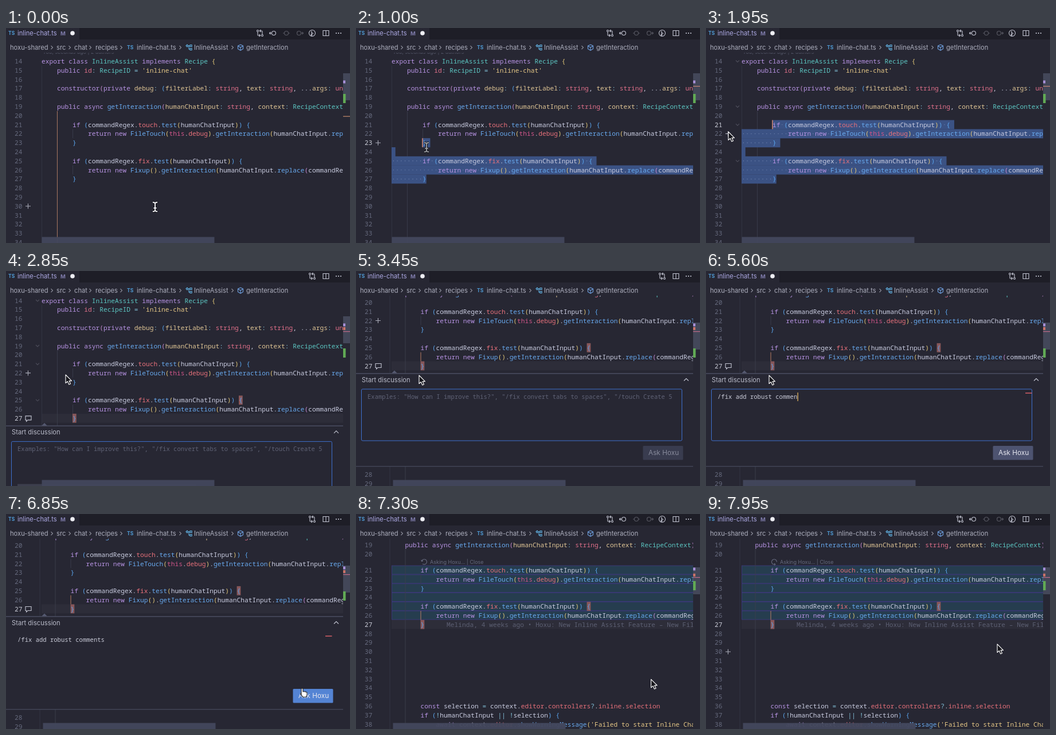
Write an HTML page that moves like this. It is 600 px wide and 375 px high and loops after 8 s.

```html
<!DOCTYPE html>
<html lang="en">
<head>
<meta charset="utf-8">
<title>Inline chat</title>
<style>
  html, body { margin: 0; width: 100%; height: 100%; overflow: hidden; background: #272733; }
  svg { display: block; width: 100vw; height: 100vh; }
  text { white-space: pre; }
  .code { font: 500 11.24px "Noto Sans Mono", monospace; }
  .num { font: 11.24px "Noto Sans Mono", monospace; }
  .input { font: 10.55px "Noto Sans Mono", monospace; }
  .ui { font: 11.2px Inter, sans-serif; }
  .lens { font: 9px Inter, sans-serif; }
  .ts { font: bold 8.5px Inter, sans-serif; }
  .icon { fill: none; stroke: #c3c5d2; stroke-width: 1.1; }
</style>
</head>
<body>
<svg id="stage" viewBox="0 0 600 375" preserveAspectRatio="none"></svg>
<script>
const LOOP = 8000, ROW = 15.8, CH = 6.745;
const OPEN = 2350, CLICK = 6800, CLOSE = 7050, ASK = 7250;
const PROMPT = '/fix add robust comments';
const HINT = 'Examples: "How can I improve this?", "/fix convert tabs to spaces", "/touch Create 5';
const BRACKETS = ['#e3c878', '#c58ad0', '#5aa5ee'];
const C = {
  bg: '#272733', text: '#c9cce0', dim: '#666a7e', key: '#b793e3', type: '#5cc6c2', prim: '#e0708a',
  param: '#dfc595', fn: '#68a9ee', prop: '#e6707a', self: '#d0558a', str: '#e5c786', op: '#85c5dd'
};
const stage = document.getElementById('stage');

// Each entry: line number -> [bracket depth at its start, text]
const lines = {
  14: [0, 'export class InlineAssist implements Recipe {'],
  15: [1, "    public id: RecipeID = 'inline-chat'"],
  17: [1, '    constructor(private debug: (filterLabel: string, text: string, ...args: unknown[]) => void) {}'],
  19: [1, '    public async getInteraction(humanChatInput: string, context: RecipeContext): Promise<null> {'],
  21: [2, '        if (commandRegex.touch.test(humanChatInput)) {'],
  22: [3, '            return new FileTouch(this.debug).getInteraction(humanChatInput.replace(commandRegex'],
  23: [3, '        }'],
  25: [2, '        if (commandRegex.fix.test(humanChatInput)) {'],
  26: [3, '            return new Fixup().getInteraction(humanChatInput.replace(commandRegex.fix'],
  27: [3, '        }'],
  36: [2, '        const selection = context.editor.controllers?.inline.selection'],
  37: [2, '        if (!humanChatInput || !selection) {'],
  38: [3, "            await context.editor.showWarningMessage('Failed to start Inline Chat"]
};
const KEYWORDS = /^(export|class|implements|public|constructor|private|async|if|return|new|const|await)$/;
const TYPES = /^(InlineAssist|Recipe|RecipeID|RecipeContext|Promise)$/;
const PRIMITIVES = /^(string|unknown|void|id)$/;

function esc(s) {
  return s.replace(/&/g, '&amp;').replace(/</g, '&lt;');
}
function span(s, color) {
  return `<tspan fill="${color}">${esc(s)}</tspan>`;
}
function wordColor(word, before, after) {
  if (KEYWORDS.test(word)) return C.key;
  if (TYPES.test(word)) return C.type;
  if (PRIMITIVES.test(word)) return C.prim;
  if (word === 'this') return C.self;
  if (after === '(') return C.fn;
  if (after === ':') return C.param;
  return before === '.' ? C.prop : C.text;
}
function highlight([depth, src]) {
  return src.replace(/'[^']*'?|\w+|[(){}[\]]|\s+|[^\w\s'(){}[\]]/g, (tok, at) => {
    if (/^\s/.test(tok)) return tok;
    if (tok[0] === "'") return span(tok, C.str);
    if (/[({[]/.test(tok)) return span(tok, BRACKETS[depth++ % 3]);
    if (/[)}\]]/.test(tok)) return span(tok, BRACKETS[--depth % 3]);
    if (/^\w/.test(tok)) return span(tok, wordColor(tok, src[at - 1], src[at + tok.length]));
    return span(tok, /[=|!?:]/.test(tok) ? C.op : C.text);
  });
}
const painted = Object.fromEntries(Object.entries(lines).map(([n, l]) => [n, highlight(l)]));

const rect = (x, y, w, h, fill, more = '') =>
  `<rect x="${x}" y="${y}" width="${w}" height="${h}" fill="${fill}" ${more}/>`;
const text = (cls, x, y, fill, s, more = '') =>
  `<text class="${cls}" x="${x}" y="${y}" fill="${fill}" ${more}>${s}</text>`;
const icon = (x, y, d, more = '') =>
  `<path class="icon" transform="translate(${x} ${y})" d="${d}" ${more}/>`;

const RING = 'M-3.5 0a3.5 3.5 0 1 0 7 0a3.5 3.5 0 1 0-7 0';
const COMPARE = 'M-4-2.5v5.5q0 1 1 1h3m-1.5-2l2 2l-2 2M4 2.5v-5.5q0-1-1-1h-3m1.5-2l-2 2l2 2M-5.5-4a1.5 1.5 0 1 0 3 0a1.5 1.5 0 1 0-3 0M2.5 4a1.5 1.5 0 1 0 3 0a1.5 1.5 0 1 0-3 0';
const SPLIT = 'M-5-4.5h10v9h-10zM0-4.5v9';
const CUBE = 'M0-5l4.5 2.2v5.2l-4.5 2.6l-4.5-2.6v-5.2zM-4.5-2.6l4.5 2.4l4.5-2.4M0-.2v5';
const TREE = 'M-5-3l2-2l2 2l-2 2zM-1-3h3M0-3v6h2M2-4.5h3v3h-3zM2 1.500h3v3h-3z';

function dots() {
  return [-4, 0, 4].map(d => `<circle cx="${580 + d}" cy="9" r="1.1" fill="#c3c5d2"/>`).join('');
}

function header(focused) {
  let s = rect(0, 0, 600, 20, '#1e1e27') + rect(0, 0, 128, 20, C.bg) + rect(0, 20, 600, 23, C.bg);
  s += text('ts', 4, 12, '#4f9bd5', 'TS') + text('ui', 20, 13, '#aca8e2', 'inline-chat.ts');
  s += text('ts', 95, 13, '#7f7cab', 'M', 'style="font-size:9.5px"');
  s += '<circle cx="116" cy="9" r="3.8" fill="#eeeef4"/>';
  if (focused) {
    const faint = 'stroke-opacity=".35"';
    s += icon(443, 9, COMPARE) + icon(467, 9, RING + 'M-3.5 0h-4m2-2l-2 2l2 2');
    s += icon(489, 9, RING + 'M-6 0h2.5M3.5 0h2.5', faint);
    s += icon(511, 9, RING + 'M3.5 0h4m-2-2l2 2l-2 2', faint);
    s += icon(534, 9, 'M-5.5 0a5.5 5.5 0 1 0 11 0a5.5 5.5 0 1 0-11 0M-1-4v7M-1-1l3 2M-2 3a1 1 0 1 0 2 0a1 1 0 1 0-2 0');
  } else s += icon(534, 9, COMPARE);
  s += icon(558, 9, SPLIT) + dots();
  const crumbs = [[7, 'hoxu-shared'], [88, 'src'], [119, 'chat'], [156, 'recipes'],
    [228, 'inline-chat.ts'], [328, 'InlineAssist'], [419, 'getInteraction']];
  for (const [x, name] of crumbs) s += text('ui', x, 38, '#acaebd', name);
  for (const x of [80, 111, 147, 201, 304, 395]) s += icon(x, 34, 'M-1.5-3l3 3l-3 3', 'stroke-opacity=".65"');
  s += text('ts', 211, 37, '#4f9bd5', 'TS');
  return s + icon(319, 34, TREE, 'style="stroke:#62b4e6"') + icon(409, 34, CUBE, 'style="stroke:#6fa0e0"');
}

// Eased value between [time, value] stops
function track(t, stops) {
  let [t0, v0] = stops[0];
  for (const [t1, v1] of stops) {
    if (t < t1) {
      const p = Math.max(0, (t - t0) / (t1 - t0));
      return v0 + (v1 - v0) * p * p * (3 - 2 * p);
    }
    [t0, v0] = [t1, v1];
  }
  return v0;
}

function layout(t) {
  const asking = t >= ASK, open = t >= OPEN && t < CLOSE;
  const top = asking ? -25.3 : t < OPEN ? 58 : track(t, [[2900, 51.5], [3350, -39.9]]);
  const x = track(t, [[2950, 62], [3300, 58.6]]);
  const y = n => top + (n - 14) * ROW + (asking && n > 20 ? 12.7 : 0) + (open && n > 27 ? 173.7 : 0);
  return { x, y, open, asking };
}

function pointer(t) {
  return {
    x: track(t, [[100, 260], [500, 125], [1000, 123], [1350, 118], [1850, 39], [2420, 39], [2830, 104], [3400, 110], [5950, 110], [6600, 517], [7100, 517], [7700, 508]]),
    y: track(t, [[100, 312], [500, 264], [620, 264], [1000, 208], [1300, 168], [1500, 168], [1850, 181], [2830, 181], [3400, 182], [5950, 182], [6600, 310], [7100, 310], [7700, 227]])
  };
}

const rowAt = (L, y) => Math.round(14 + (y - 3 - L.y(14)) / ROW);

// The drag runs upwards from line 27 and ends on line 21
function dragRow(t, L, m) {
  return t > 1300 ? 21 : Math.max(21, Math.min(27, rowAt(L, m.y)));
}

function selection(t, L, m) {
  if (t < 620 || t >= OPEN) return '';
  const from = dragRow(t, L, m);
  let s = '';
  for (let n = from; n <= 27; n++) {
    const src = lines[n] ? lines[n][1] : '';
    const a = n === from ? 8 : 0, b = src.length + (n < 27 ? 1 : 0);
    const x = L.x + a * CH;
    s += rect(x, L.y(n) - 8, Math.min(588 - x, (b - a) * CH), ROW + .2, '#3b5284');
    for (let i = a; i < src.length; i++) {
      if (src[i] === ' ') s += `<circle cx="${L.x + (i + .5) * CH}" cy="${L.y(n)}" r=".7" fill="#6f83ae"/>`;
    }
  }
  return s + rect(L.x + 8 * CH - .7, L.y(from) - 8, 1.4, ROW, '#dd8f78');
}

function guides(t, L) {
  const bar = (col, a, b, color) => rect(L.x + col * CH, L.y(a) - 8, .9, L.y(b) - L.y(a) + ROW, color);
  const faint = '#3c3e4d';
  return bar(0, 15, 40, '#343644') +
    bar(4, 20, 40, t < 500 ? '#b98368' : faint) + bar(8, 22, 22, faint) +
    bar(8, 26, 26, t >= 3000 ? '#c98668' : faint);
}

function editor(t, L, m) {
  const { x, y } = L;
  const after = t >= OPEN;
  let s = '';
  if (after) s += rect(62, y(27) - 8, 526, ROW, '#2d2d39');
  if (L.asking) {
    for (let n = 21; n < 27; n++) {
      s += rect(62.5, y(n) - 7.9, 526, ROW - .8, '#263d4f', 'stroke="#3c3a7c" stroke-width=".9"');
    }
    s += text('lens', 129, 86.7, C.dim, 'Asking Hoxu... | Close');
    const spin = (t - ASK) * .36;
    s += `<g transform="translate(119 83.5) rotate(${spin})"><path class="icon" style="stroke:${C.dim}" d="M-4.5 0a4.5 4.5 0 1 1 3 4.2M-6-1.5l1.5 2l2-1.5"/></g>`;
  }
  s += guides(t, L) + selection(t, L, m);
  if (after) {
    for (const [n, col] of [[25, 51], [27, 8]]) s += rect(x + col * CH, y(n) - 8, CH, ROW, '#87575a');
  }
  s += text('lens', x + 2, y(14) - 13.2, '#55586a', 'You, seconds ago | 2 authors');
  const active = after ? 27 : t > 500 ? dragRow(t, L, m) : 0;
  for (let n = 14; n < 40; n++) {
    if (y(n) < 34 || y(n) > 385) continue;
    s += text('num', 15, y(n) + 4, n === active ? '#c9cbd6' : C.dim, n);
    if (painted[n]) s += text('code', x, y(n) + 4, C.text, painted[n]);
  }
  if (L.asking) {
    s += text('num', x + 99.5, y(27) + 4, '#5c5f72', 'Melinda, 4 weeks ago • Hoxu: New Inline Assist Feature – New File');
  }
  if (t > 1700 && t < 3000) {
    for (const n of [14, 19, 21, 25]) s += icon(55, y(n), 'M-3-1.5l3 3l3-3', 'stroke-opacity=".25"');
  }
  let plus = 0;
  if (t < OPEN) plus = rowAt(L, m.y);
  else if (t < 3600) plus = 22;
  else if (t > 7500) plus = 30;
  if (plus) s += icon(38.5, y(plus), 'M-4.5 0h9M0-4.5v9', 'stroke-opacity=".85"');
  if (L.open) s += icon(39, y(27), 'M-5-4h10v7h-6l-2.5 2.5v-2.5h-1.5z');
  return s;
}

function widget(t, top) {
  const typed = PROMPT.slice(0, Math.max(0, Math.floor((t - 3800) / 80)));
  const focus = t < CLICK, hover = t > 6540;
  let s = rect(0, top, 588, 162.5, C.bg);
  s += `<path d="M62 ${top}l5-5l5 5z" fill="#555970"/>`;
  s += rect(0, top - .5, 588, 1.6, '#484b5e') + rect(0, top + 161.7, 588, 1.2, '#484b5e');
  s += text('ui', 10, top + 15, '#b9bbc9', 'Start discussion');
  s += icon(576, top + 11, 'M-4 2l4-4l4 4');
  if (focus) s += rect(9.5, top + 27.5, 559, 90, 'none', 'rx="2" stroke="#3e70cf"');
  if (typed) {
    s += text('input', 20, top + 44.5, '#c9cbd8', typed);
    s += rect(557, top + 33.5, 11.5, 1.8, '#b9565f');
  } else s += text('input', 20, top + 44.5, '#5f6275', esc(HINT));
  const typing = t > 3800 && t < 5800;
  if (focus && t > 3500 && (typing || t % 1000 < 500)) {
    s += rect(20 + typed.length * 6.34, top + 33.5, 1.3, 15, '#e0b25c');
  }
  s += rect(500.5, top + 126.5, 70, 24.5, !typed ? '#393c4f' : hover ? '#5484d4' : '#4d5370', 'rx="1.5"');
  return s + text('ui', 510, top + 142.8, typed ? '#e6e7f0' : '#888b9c', 'Ask Hoxu', 'style="font-size:11.8px"');
}

function scrollbars(t, L) {
  let s = rect(588, 43, 12, 332, C.bg);
  const top = track(t, [[2900, 79], [3350, 90]]) + (L.asking ? 3 : 0);
  s += rect(588, top, 12, 47, '#434759');
  const shift = L.asking ? 2 : 0, green = L.open ? 135 : 115 + shift;
  s += rect(588, 91.5 + shift, 4, 5, '#a68fd6');
  s += rect(588, green, 4.5, 16, '#61aa55');
  if (t >= OPEN) s += rect(588, 98 + shift * 3, 4, 5, '#c87268') + rect(588, 105 + shift * 2.5, 12, 1.2, '#c06a86');
  else if (t < 500) s += rect(588, 153.5, 12, 1.3, '#b98368');
  else s += rect(588, 101, 12, 1.2, '#c58474');
  if (L.open && t < 3000) s += rect(20, 371.5, 311, 3.5, '#3c3e4d');
  return s + rect(t < 3200 ? 62.5 : 64.5, 364.5, 301, 10.5, '#43475c', 'fill-opacity=".95"');
}

function cursor(t, m) {
  const path = (d, fill, stroke, width) =>
    `<path transform="translate(${m.x} ${m.y})" d="${d}" fill="${fill}" stroke="${stroke}" stroke-width="${width}" stroke-linejoin="round"/>`;
  if (t < 1600) {
    const d = 'M-4-8q4 0 4 2.5q0-2.5 4-2.5M0-5.5v11M-4 8q4 0 4-2.5q0 2.5 4 2.5M-2.5 2h5';
    return path(d, 'none', '#15151b', 4) + path(d, 'none', t > 620 ? '#9a9ca2' : '#f2f2f6', 1.9);
  }
  if (t > 6540 && t < 7150) {
    return path('M-2 5v-9q0-2 1.5-2t1.5 2v4q1-1 2.5 0q2-.8 2.5.8q1.800-.5 2 1v3q0 3-2 4.5h-5l-4-5q-1-2 1-1.5z', '#fff', '#222', 1.1);
  }
  return path('M0 0v14.5l3.400-3l2.400 5.500l2.700-1.200l-2.400-5.200h4.400z', '#16161c', '#fff', 1.1);
}

function render(t) {
  const L = layout(t), m = pointer(t);
  stage.innerHTML = '<clipPath id="body"><rect y="43" width="588" height="332"/></clipPath>' +
    rect(0, 0, 600, 375, C.bg) +
    `<g clip-path="url(#body)">${editor(t, L, m)}${L.open ? widget(t, L.y(27) + 13) : ''}</g>` +
    scrollbars(t, L) + header(!L.open) + cursor(t, m);
}

const start = performance.now();
function frame() {
  render((performance.now() - start) % LOOP);
  requestAnimationFrame(frame);
}
frame();
</script>
</body>
</html>
```
